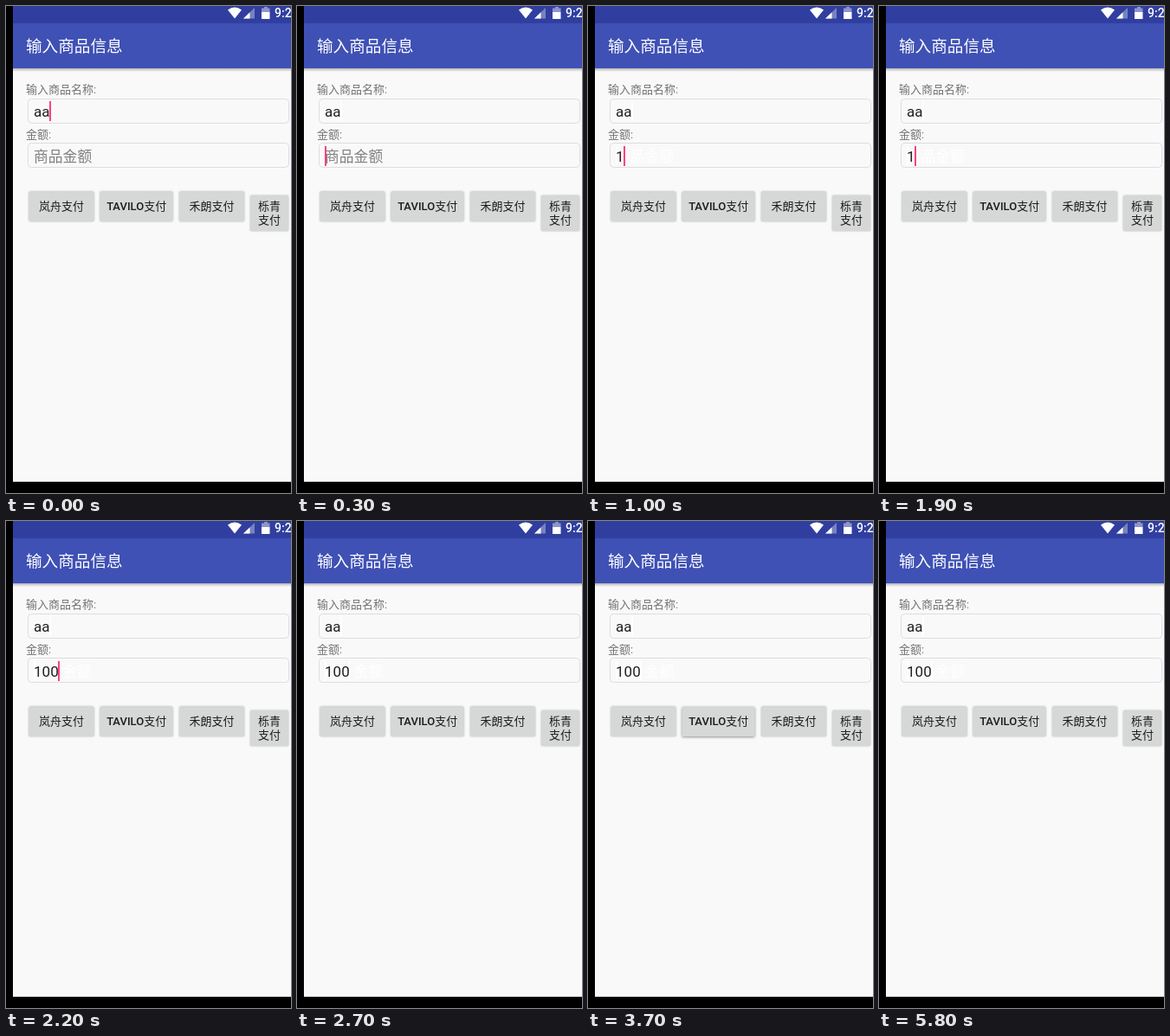
An HTML page for the animation above (8 s loop, 329 by 563 pixels).

```html
<!DOCTYPE html>
<html lang="zh-CN">
<head>
<meta charset="utf-8">
<style>
  html, body { margin: 0; width: 100%; height: 100%; overflow: hidden; background: #000; }
  svg { display: block; width: 329px; height: 563px; }
  text { font-family: Roboto, "Noto Sans CJK SC", "Noto Sans CJK", sans-serif; white-space: pre; }
  .label { font-size: 13px; fill: #737373; }
  .input { font-size: 17px; fill: #212121; }
  .hint { font-size: 16.8px; fill: #808080; }
  .field { fill: #f9f9f9; stroke: #dcdce6; }
  .button rect { fill: #d6d7d7; filter: drop-shadow(0 .6px 1px rgba(0, 0, 0, .28)); }
  .button text { font-size: 13px; fill: #1c1c1c; text-anchor: middle; }
  .latin { font-weight: 500; }
</style>
</head>
<body>
<svg viewBox="0 0 329 563">
  <defs>
    <linearGradient id="drop" x2="0" y2="1">
      <stop stop-color="#b4b4b8"/>
      <stop offset="1" stop-color="#f9f9f9"/>
    </linearGradient>
  </defs>

  <path fill="#f9f9f9" d="M8 0H329V550H8z"/>
  <path fill="#303f9f" d="M8 0H329V20H8z"/>
  <path fill="#3f51b5" d="M8 20H329V72H8z"/>
  <path fill="url(#drop)" d="M8 72H329V76H8z"/>

  <g fill="#fff">
    <path d="M264 14.5L256 4.6Q264-1.4 272 4.6z"/>
    <path fill-opacity=".35" d="M274 14.5H287V2z"/>
    <path d="M274 14.5H281.5V7.3z"/>
    <path fill-opacity=".45" d="M295 7V2.5H298V1H302V2.5H304.5V7z"/>
    <path d="M295 7H304.5V15H295z"/>
    <text class="latin" x="310" y="13.3" font-size="14">9:2</text>
    <text x="23" y="52.5" font-size="18.6">输入商品信息</text>
  </g>

  <text class="label" x="23" y="101">输入商品名称:</text>
  <rect class="field" x="25.5" y="107.5" width="301" height="28" rx="4"/>
  <rect id="caretName" x="50" y="110" width="2" height="23"/>
  <text class="input" x="32" y="128.3">aa</text>

  <text class="label" x="23" y="152.5">金额:</text>
  <rect class="field" x="25.5" y="158.5" width="301" height="28" rx="4"/>
  <text class="hint" x="32" y="180"><tspan id="hint1">商</tspan><tspan id="hint2">品</tspan><tspan id="hint3">金额</tspan></text>
  <rect id="caret0" x="32" y="162" width="2" height="23"/>
  <rect id="caret1" x="41" y="162" width="2" height="23"/>
  <rect id="caret2" x="51" y="162" width="2" height="23"/>
  <rect id="caret3" x="60" y="162" width="2" height="23"/>
  <text class="input" x="32" y="180"><tspan id="digit1">1</tspan><tspan id="digit2">0</tspan><tspan id="digit3">0</tspan></text>

  <g class="button">
    <rect x="26.5" y="214.5" width="75" height="34.5" rx="1.5"/>
    <text x="64" y="236">岚舟支付</text>
  </g>
  <g class="button">
    <rect id="pressed" x="108.5" y="214.5" width="84" height="34.5" rx="1.5"/>
    <text x="150.7" y="236"><tspan class="latin">TAVILO</tspan>支付</text>
  </g>
  <g class="button">
    <rect x="200" y="214.5" width="75" height="34.5" rx="1.5"/>
    <text x="237.5" y="236">禾朗支付</text>
  </g>
  <g class="button">
    <rect x="282" y="219" width="44" height="41" rx="1.5"/>
    <text x="304" y="236">栎青</text>
    <text x="304" y="251.5">支付</text>
  </g>
</svg>
<script>
const LOOP = 8000;
const PINK = '#ff4081', WHITE = '#fff', INK = '#212121', HINT = '#808080', NONE = 'transparent';
const shadow = (y, blur, alpha) => `drop-shadow(0 ${y}px ${blur}px rgba(0, 0, 0, ${alpha}))`;
const REST = shadow(.6, 1, .28);

// Each step is [start in ms, value]; values are held until the next step.
function hold(id, prop, steps) {
  const frames = steps.map(([ms, value]) => ({ offset: ms / LOOP, [prop]: value, easing: 'step-end' }));
  frames.push({ offset: 1, [prop]: steps.at(-1)[1] });
  const anim = document.getElementById(id).animate(frames, { duration: LOOP, iterations: Infinity });
  anim.startTime = 0;
  return anim;
}

const fills = {
  caretName: [[0, PINK], [100, WHITE]],
  caret0: [[0, NONE], [300, PINK], [800, WHITE]],
  caret1: [[0, NONE], [1000, PINK], [1400, WHITE], [1900, PINK], [2100, NONE]],
  caret2: [[0, NONE], [2100, PINK], [2200, NONE]],
  caret3: [[0, NONE], [2200, PINK], [2700, WHITE]],
  hint1: [[0, HINT], [1000, NONE]],
  hint2: [[0, HINT], [1000, WHITE], [2100, NONE]],
  hint3: [[0, HINT], [1000, WHITE]],
  digit1: [[0, NONE], [1000, INK]],
  digit2: [[0, NONE], [2100, INK]],
  digit3: [[0, NONE], [2200, INK]]
};
for (const id in fills) hold(id, 'fill', fills[id]);

hold('pressed', 'filter', [[0, REST], [3200, shadow(1, 1.5, .36)], [3300, shadow(1.4, 1.8, .42)], [5800, REST]]);
</script>
</body>
</html>
```
